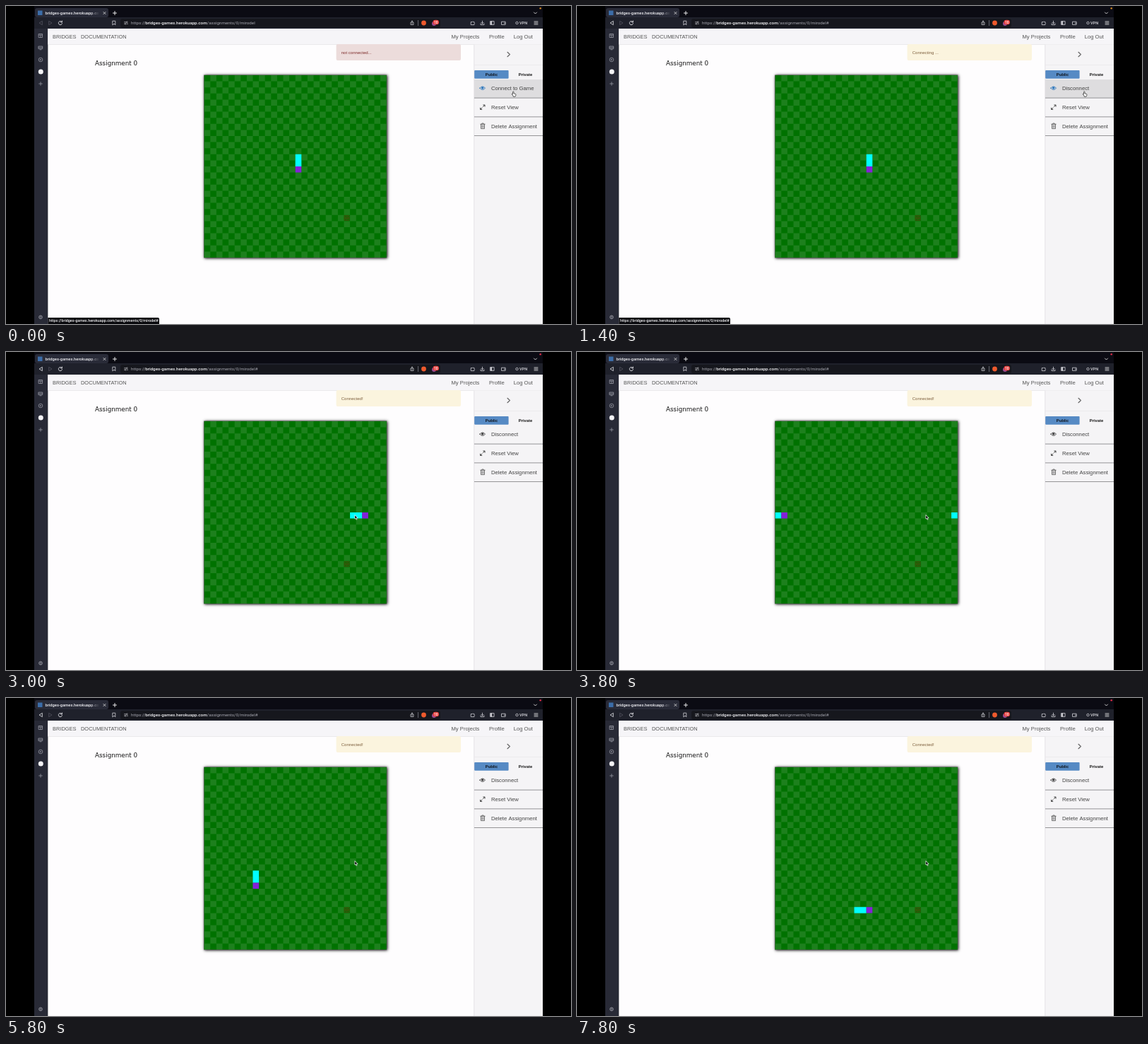
Write an HTML page with a canvas that moves like this. It is 800 by 450 pixels and loops after 8 s.

```html
<!DOCTYPE html>
<html lang="en">
<head>
<meta charset="utf-8">
<title>Snake</title>
<style>
  html, body { margin: 0; width: 100%; height: 100%; overflow: hidden; background: #000; }
  canvas { display: block; width: 800px; height: 450px; }
</style>
</head>
<body>
<canvas id="stage" width="800" height="450"></canvas>
<script>
const ctx = document.getElementById('stage').getContext('2d');
const LOOP = 8000, TICK = 200;
const CLICK = 1000, CONNECTED = 1800, LEAVE = 1600, ARRIVE = 2000;
const STEP = 180;
const BOARD = { x: 280.7, y: 98, cells: 30, size: 8.6 };
const SANS = '"Liberation Sans", Arial, sans-serif';
const UI = 'Roboto, sans-serif';
const PAGE = 'https://bridges-games.herokuapp.com/assignments/0/mirodel';

function rect(x, y, w, h, color) {
  ctx.fillStyle = color;
  ctx.fillRect(x, y, w, h);
}

function round(x, y, w, h, r, color) {
  ctx.fillStyle = color;
  ctx.beginPath();
  ctx.roundRect(x, y, w, h, r);
  ctx.fill();
}

function dot(x, y, r, color) {
  ctx.fillStyle = color;
  ctx.beginPath();
  ctx.arc(x, y, r, 0, 7);
  ctx.fill();
}

function ring(x, y, r, color, width = 0.8) {
  ctx.strokeStyle = color;
  ctx.lineWidth = width;
  ctx.beginPath();
  ctx.arc(x, y, r, 0, 7);
  ctx.stroke();
}

function path(d, x, y, stroke, width = 0.8, fill) {
  const p = new Path2D(d);
  ctx.save();
  ctx.translate(x, y);
  if (fill) { ctx.fillStyle = fill; ctx.fill(p); }
  if (stroke) {
    ctx.strokeStyle = stroke;
    ctx.lineWidth = width;
    ctx.lineJoin = ctx.lineCap = 'round';
    ctx.stroke(p);
  }
  ctx.restore();
}

function text(str, x, y, size, color, family = SANS, weight = 400) {
  ctx.font = `${weight} ${size}px ${family}`;
  ctx.fillStyle = color;
  ctx.fillText(str, x, y);
}

function drawTabs(t) {
  rect(40, 0, 720, 17, '#0b0b13');
  round(41, 3, 104, 13, 3, '#292b38');
  rect(45, 6.5, 6.5, 6.5, '#3c6da8');
  const fade = ctx.createLinearGradient(120, 0, 132, 0);
  fade.addColorStop(0, '#eeeef2');
  fade.addColorStop(1, '#eeeef200');
  text('bridges-games.herokuapp.com', 55.5, 11.9, 5.8, fade, UI, 500);
  path('M-1.6-1.6L1.6 1.6M1.6-1.6L-1.6 1.6', 139.5, 10, '#ddd');
  path('M-2.5 0H2.5M0-2.5V2.5', 154, 10, '#fff', 0.9);
  path('M-2-1L0 1L2-1', 749.5, 10, '#ddd', 0.9);
  dot(756.7, 3.3, 1.3, t < CONNECTED ? '#c9811f' : '#d92a45');
}

function drawToolbar(t) {
  const clicked = t >= CLICK, pale = '#d4d4da', dim = '#53545f';
  rect(40, 16, 720, 16, '#1f212b');
  round(162, 18, 453, 12.5, 3, '#16171d');
  path('M2-2.5L-2 0L2 2.5Z', 49, 24, clicked ? '#e4e4e8' : dim);
  path('M-2-2.5L2 0L-2 2.5Z', 63, 24, dim);
  path('M2-1.5A2.6 2.6 0 1 0 2.5.6M2.4-3V-1.1H.4', 77, 24, '#e4e4e8', 0.9);
  path('M-1.8-2.8H1.8V2.8L0 1L-1.8 2.8Z', 153, 24, pale);
  path('M-2.5-1.2H.5M1.5 1.2H2.5M-2.5 1.2H-1.5', 170, 24, pale, 0.7);
  ring(171.4, 22.8, 0.8, pale, 0.6);
  ring(169.4, 25.2, 0.8, pale, 0.6);

  const y = 26.1, size = 6.25, domain = 'bridges-games.herokuapp.com';
  let x = 177;
  for (const part of ['https://', domain, '/assignments/0/mirodel' + (clicked ? '#' : '')]) {
    const main = part === domain;
    text(part, x, y, size, main ? '#f2f2f5' : '#a6a7b0', UI, main ? 500 : 400);
    x += ctx.measureText(part).width;
  }

  path('M-1-1H-2V2.5H2V-1H1M0 1V-3M-1-2L0-3L1-2', 575, 24, pale, 0.7);
  rect(583, 20, 0.8, 8, '#777883');
  dot(591.5, 24, 3.4, '#ef5a2d');
  dot(606, 25, 3, '#9a4b93');
  round(604.5, 19.7, 8.5, 6.5, 3, '#e6423f');
  text('10', 606.2, 24.8, 4.6, '#fff', UI, 500);

  path('M-2.4-1.4H-.8A1 1 0 0 1 1-1.4H2V0A1 1 0 0 1 2 1.6V2.6H-2.4Z', 661, 24, pale);
  path('M0-2.8V1M-1.6-.6L0 1L1.6-.6M-2.5 1V2.6H2.5V1', 674.5, 24, pale);
  path('M-2.6-2.4H2.6V2.4H-2.6ZM-.8-2.4V2.4', 688.5, 24, pale);
  rect(686.2, 21.8, 1.8, 4.6, pale);
  path('M-2.6-1.8H2.6V2.4H-2.6ZM.8.3H2.6', 704.5, 24, pale);
  ring(723.5, 24, 1.7, pale);
  text('VPN', 727, 26, 5.6, pale, UI, 500);
  path('M-2.5-2H2.5M-2.5 0H2.5M-2.5 2H2.5', 750.5, 24, '#eee', 0.8);
}

function drawSidebar() {
  const gray = '#9697a1';
  rect(40, 32, 19.3, 418, '#282a36');
  path('M-2.5-2.5H2.5V2.5H-2.5ZM-2.5-.8H2.5M0-.8V2.5', 49, 42, gray);
  path('M-2.7-2H2.7V1.6H-2.7ZM-2.7-.2H2.7M-1 2.8H1', 49, 59, gray);
  ring(49, 76, 2.8, gray);
  path('M-.8-1.3L1.4 0L-.8 1.3Z', 49, 76, null, 0, gray);
  dot(49.3, 93, 3.5, '#f4f4f6');
  path('M-2.3 0H2.3M0-2.3V2.3', 49, 110, gray);
  ring(49, 440.3, 2.3, gray, 1);
  ring(49, 440.3, 0.8, gray, 0.7);
}

function drawPage(t) {
  rect(59.3, 32, 700.7, 418, '#fefdfe');
  rect(59.3, 32, 700.7, 22, '#f6f5f8');
  rect(59.3, 54, 700.7, 0.7, '#e3e2e5');
  text('BRIDGES', 66, 46.1, 7.45, '#555');
  text('DOCUMENTATION', 106, 46.1, 7.45, '#555');
  text('My Projects', 630.5, 46.1, 7.65, '#555');
  text('Profile', 684, 46.1, 7.65, '#555');
  text('Log Out', 718.7, 46.1, 7.65, '#555');
  text('Assignment 0', 126, 84.2, 8.8, '#151515', '"DejaVu Sans", sans-serif');

  const waiting = t < CLICK;
  const message = waiting ? 'not connected...' : t < CONNECTED ? 'Connecting ...' : 'Connected!';
  round(467.6, 54, 176.4, 23, 2, waiting ? '#ecdcdb' : '#fbf4de');
  text(message, 474.7, 67.5, 6.05, waiting ? '#7c2928' : '#7b5c3a');
}

function drawPanel(t, hover) {
  rect(662.5, 54.5, 97.5, 395.5, '#f5f4f6');
  rect(662.5, 54.5, 0.7, 395.5, '#dddce0');
  rect(663, 83, 97, 0.6, '#e6e5e8');
  path('M-1.7-3.2L1.7 0L-1.7 3.2', 711.7, 68.5, '#666', 1.2);
  round(663.2, 91, 48.4, 11.8, 1, '#568ac4');
  text('Public', 678.8, 99.2, 5.8, '#10151c', SANS, 700);
  text('Private', 725.8, 99.2, 5.8, '#151515', SANS, 700);
  if (hover) rect(663, 104, 97, 26, '#dedddf');
  for (const y of [129.7, 156.5, 183.2]) rect(663, y, 97, 0.8, '#7d7d80');

  const eye = hover ? '#2f78bd' : '#444';
  path('M-3.8 0Q0-4.6 3.8 0Q0 4.6-3.8 0Z', 674.7, 116.2, eye, 0.9);
  dot(674.7, 115.9, 1.7, eye);
  path('M.8-.8L3-3M1-3.2H3.2V-1M-.8.8L-3 3M-3.2 1V3.2H-1', 674.8, 143.2, '#444', 1);
  path('M-3.2-2.6H3.2M-1.2-2.8V-3.8H1.2V-2.8M-2.5-2.4V3.8H2.5V-2.4M-.9-1V2.4M.9-1V2.4', 675, 169.8, '#555', 0.8);
  text(t < CLICK ? 'Connect to Game' : 'Disconnect', 686.9, 119.3, 7.75, '#444');
  text('Reset View', 686.9, 146.3, 7.75, '#444');
  text('Delete Assignment', 686.9, 173.2, 7.75, '#444');
}

// One path for all cells, so that neighbours join without a seam.
function fillCells(cells, color) {
  const { x, y, size } = BOARD;
  ctx.fillStyle = color;
  ctx.beginPath();
  for (const [col, row] of cells) ctx.rect(x + col * size, y + row * size, size, size);
  ctx.fill();
}

// Right across the wrapped edge, then down, then right again.
function snakeAt(s) {
  if (s <= 16) return [(22 + s) % 30, 15];
  if (s <= 24) return [8, s - 1];
  return [s - 16, 23];
}

function drawBoard(t) {
  const { x, y, cells, size } = BOARD, side = cells * size;
  ctx.save();
  ctx.shadowColor = '#000';
  ctx.shadowBlur = 4;
  ctx.shadowOffsetX = 0.3;
  ctx.shadowOffsetY = 0.6;
  rect(x - 0.5, y - 0.5, side + 1, side + 1, '#4c5a4c');
  ctx.restore();
  rect(x, y, side, side, '#007200');
  const light = [];
  for (let row = 0; row < cells; row++)
    for (let col = 1 - row % 2; col < cells; col += 2) light.push([col, row]);
  fillCells(light, '#1d801d');

  path('M1 1H7.4V7.4H1ZM2.8 2.4V6M4.4 1.6L5.6 4L4.2 6.8M1.4 4.3H7', x + 23 * size, y + 23 * size, '#5d4310', 0.75);

  const s = Math.floor((t - 2200) / STEP + 0.5);
  const [head, ...body] = [0, 1, 2].map(i => t < CONNECTED ? [15, 15 - i] : snakeAt(s - i));
  fillCells(body, '#00ffff');
  fillCells([head], '#8420d8');
}

function drawStatus(t) {
  ctx.globalAlpha = Math.max(0, Math.min(1, (2400 - t) / 400));
  round(59.3, 441, 157.7, 9, [0, 2, 0, 0], '#08080c');
  text(PAGE + '#', 61, 447.3, 5.4, '#f2f2f4', UI, 500);
  ctx.globalAlpha = 1;
}

function drawCursor(x, y, hand) {
  if (hand) {
    path('M-1.2 2.2L-2.8.2Q-2.8-1-1.4.2V-3.2Q-.7-4.2 0-3.2V-.8L2.6-.1Q3.2.3 2.8 2L2 3.6H-.4Z', x, y + 0.6, '#333', 0.8, '#fff');
  } else {
    path('M0 0V5.2L1.2 4.1L2 6.2L3 5.8L2.1 3.7H3.7Z', x, y, '#e8e8e8', 0.9, '#111');
    path('M.3.8V4.4L1.3 3.5L2.2 5.6L2.5 5.5L1.7 3.4H3Z', x, y, null, 0, '#111');
  }
}

function draw(t) {
  const p = Math.max(0, Math.min(1, (t - LEAVE) / (ARRIVE - LEAVE)));
  const ease = p * p * (3 - 2 * p);
  const hover = p === 0;
  rect(0, 0, 800, 450, '#000');
  drawTabs(t);
  drawToolbar(t);
  drawSidebar();
  drawPage(t);
  drawPanel(t, hover);
  drawBoard(t);
  drawStatus(t);
  drawCursor(719 - 225 * ease, 124 + 107 * ease, hover);
}

const start = performance.now();
function frame() {
  const t = (performance.now() - start) % LOOP;
  draw(Math.floor(t / TICK) * TICK);
  requestAnimationFrame(frame);
}
frame();
</script>
</body>
</html>
```
